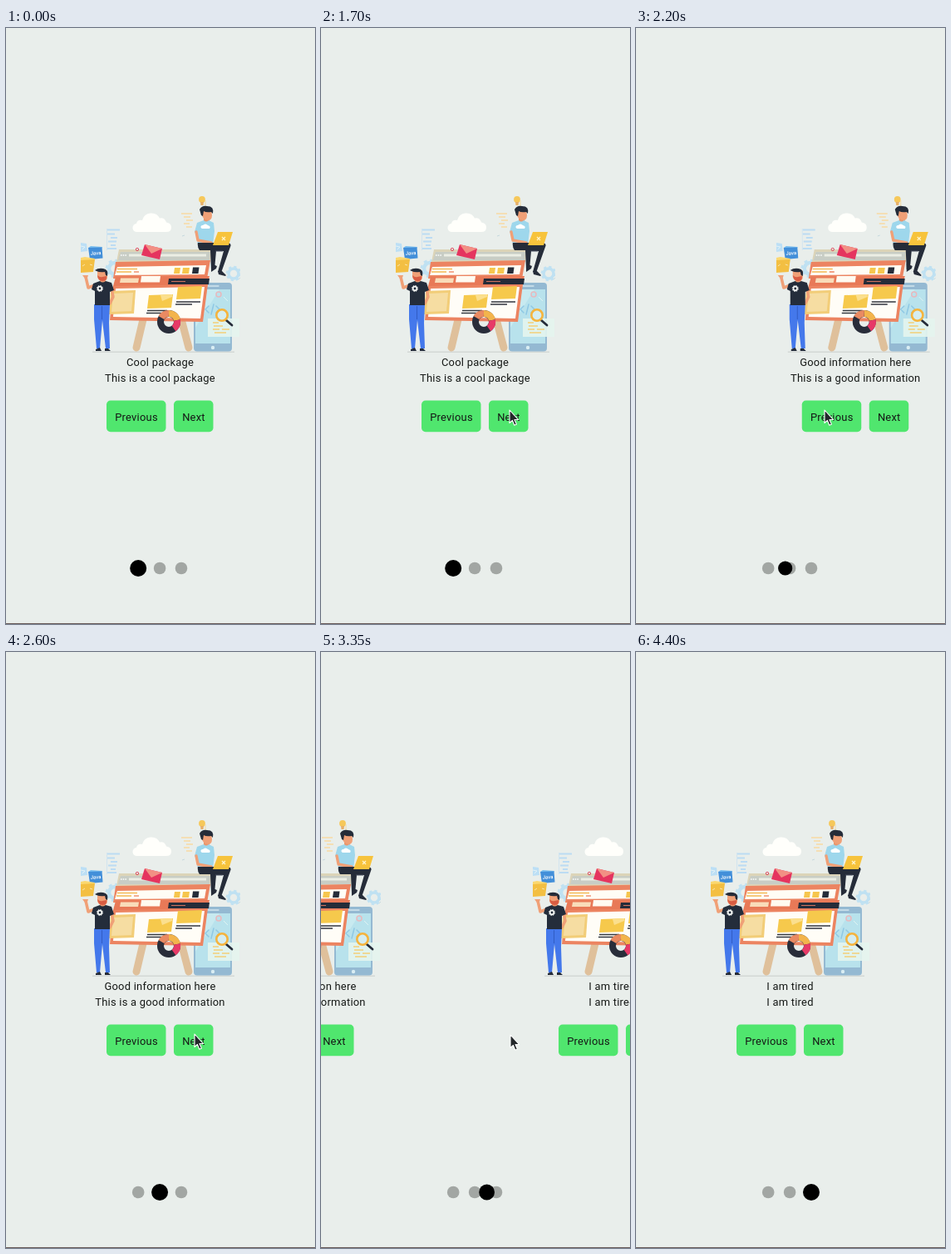
Recreate the animation shown at these times as an HTML page. Size 372 by 716 pixels, loop 5.55 s.

```html
<!DOCTYPE html>
<html lang="en">
<head>
<meta charset="utf-8">
<title>Onboarding pages</title>
<style>
html, body { margin: 0; height: 100%; overflow: hidden; background: #e9eeeb; }
svg { display: block; width: 100vw; height: 100vh; }
text { font: 12.95px Roboto, Arial, sans-serif; letter-spacing: .23px; text-anchor: middle; fill: #151816; }
#art text { font-size: 6px; font-weight: 500; letter-spacing: 0; fill: #fff; }
.line { fill: none; stroke-linecap: round; stroke-linejoin: round; }
</style>
</head>
<body>
<svg viewBox="0 0 372 716" preserveAspectRatio="none">
<defs>
<clipPath id="frame"><rect x="90" y="200" width="192" height="192"/></clipPath>

<g id="art" clip-path="url(#frame)">
  <path d="M104 389.3H275" stroke="#d3d8d5" stroke-width="1.6"/>

  <!-- cloud, bulb and floating code -->
  <path d="M158 245a5 5 0 0 1-1-10q1-5 7-4 2-8 10-8.500 8-.5 11 6 6-1 8 5 6 1 6 6 0 5.500-6 5.500z" fill="#fffffb"/>
  <circle cx="236" cy="206" r="3.900" fill="#f6c85a"/>
  <path d="M234 209h4l-.5 4h-3z" fill="#e7b06a"/>
  <path d="M240 207v7" stroke="#f3d9a0"/>
  <g stroke="#bcdcf3" stroke-width="2.200">
    <path d="M122 242.500h15M122 247.500h9M126 252h8M123 256.500h10M126 261h6M122 265h11"/>
    <path d="M121.500 241v26" stroke-width="1" opacity=".5"/>
  </g>
  <path d="M211 223h13M214 227h8M217 231h8M214 235h7M217 239h7" stroke="#f4dfb5" stroke-width="1.800"/>
  <path d="M212 250l3-1M280 302l2-2" stroke="#c5d8de"/>
  <path d="M90 258l7 1 1 9-8 1z" fill="#bcdff5"/>
  <path d="M90 262l5 1-3 3" class="line" stroke="#e4f2f6"/>
  <g fill="none" stroke="#bfe1f2">
    <circle cx="131" cy="289" r="7" stroke-width="4.500"/>
    <circle cx="131" cy="289" r="10" stroke-width="2.500" stroke-dasharray="4 3.850"/>
    <circle cx="274" cy="295" r="6" stroke-width="3.500"/>
    <circle cx="274" cy="295" r="8.300" stroke-width="2" stroke-dasharray="3.300 3.220"/>
  </g>

  <!-- cubes -->
  <path d="M99 264l3-2 14 1-1 2z" fill="#77bcee"/>
  <path d="M99 264l16.500-.5 1 13-15.500 1.500z" fill="#438fd9"/>
  <text x="108" y="272.500" transform="rotate(-3 108 272)">Java</text>
  <path d="M90 276l5-1 12 2-2 4-15-1z" fill="#fbd870"/>
  <path d="M90 279l17-1-2 15-15 1z" fill="#f3bf42"/>
  <path d="M92 286l3-2M101 284l3 1" stroke="#fae5aa"/>

  <!-- phone -->
  <rect x="226" y="306" width="46" height="82.500" rx="4" fill="#94b9d2"/>
  <path d="M228 314h42v65h-42z" fill="#b8e2ec"/>
  <path d="M228 314h29l-29 46z" fill="#c8eaf0"/>
  <path d="M242 310h14" class="line" stroke="#d3e6ee" stroke-width="1.300"/>
  <circle cx="249" cy="384" r="2.200" fill="#d9edf3"/>
  <circle cx="256" cy="320" r="3" fill="none" stroke="#e8b8bd" stroke-width="1.500"/>
  <path d="M231 324h7M233 328h6M262 323l5 5" stroke="#dff2f2"/>
  <path d="M244 334l-4 4 4 4M250 332l-3 12M253 334l4 4-4 4" class="line" stroke="#8fc8e4" stroke-width="1.500"/>

  <!-- easel -->
  <g class="line" stroke="#dfc09b" stroke-width="9">
    <path d="M166 346L157 384M210 346L220 384"/>
  </g>
  <path d="M136 266H248L246 281H133z" fill="#dcd4b8"/>
  <path d="M138 269H246L245 279H135z" fill="#c8cdc5"/>
  <path d="M148 273H241" stroke="#eceee4" stroke-width="3"/>
  <path d="M138 273h7" stroke="#fff" stroke-width="1.500" stroke-dasharray="1.500 1.200"/>
  <path d="M132 281L246 279L242 301H129z" fill="#ec8461"/>
  <path d="M134 287L241 285L239 296L131 297z" fill="#fffdf5"/>
  <path d="M134 289.500h24M133 293h18" stroke="#f4b956" stroke-width="1.600"/>
  <path d="M154 293h6" stroke="#ec8461" stroke-width="1.300"/>
  <path d="M203 288h7l-1 7h-7zM213 288h8l-1 7h-8z" fill="#f6c64e"/>
  <path d="M225 287.500h7.500l-1 7.500h-7.500z" fill="#252c39"/>
  <path d="M132 299L245 298L242 310H129z" fill="#e87957"/>
  <path d="M138 300.500h22l-1 5.500h-22z" fill="#f9dcb9"/>
  <path d="M163 298h23l-1 7.500h-23z" fill="#fffaf0"/>
  <path d="M196 301h49l-1 7h-49z" fill="#252c39"/>
  <path d="M199 304.500h17" stroke="#cf7260" stroke-width="1"/>
  <path d="M129 310L243 308L237 353L125 351z" fill="#ec8461"/>
  <path d="M132 313L239 311L234 349L129 347z" fill="#fffdf7"/>
  <path d="M126 316l30-1-2 28-30 1z" fill="#f2cd78"/>
  <path d="M129 319l24-1-2 22-24 1z" fill="#f6dda2"/>
  <path d="M172 321l29-1-2 16-29 1z" fill="#f6c94c"/>
  <path d="M186 321l2 7 12-5v-3z" fill="#fbdf8d"/>
  <path d="M207 311l29-1-2 15-29 1z" fill="#f6c94c"/>
  <path d="M205 329h29M204 332h20M170 339.500h24M169 342.500h18" stroke="#343941" stroke-width="1.400"/>
  <g fill="none" stroke-width="8">
    <circle cx="196" cy="353" r="10" stroke="#292d3a"/>
    <path d="M196 343a10 10 0 0 1 10 8" stroke="#f3b44c"/>
    <path d="M206 351a10 10 0 0 1-4 10" stroke="#e73967"/>
    <path d="M187 348a10 10 0 0 1 9-5" stroke="#e98a62"/>
  </g>

  <!-- envelope -->
  <path d="M167 260l21 5-3 13-22-5z" fill="#e5345f"/>
  <path d="M167 260l21 5-13 6z" fill="#f29084"/>
  <circle cx="158" cy="266" r="1.700" fill="none" stroke="#de5265"/>

  <!-- search panel -->
  <path d="M243 349h38v22h-38z" fill="#e5f5ef" opacity=".9"/>
  <path d="M249 354h7M250 358h11M249 362h8M260 362h9M251 366h14" stroke="#f2cf79" stroke-width="1.700"/>
  <path d="M265 351l7 6" class="line" stroke="#252c39" stroke-width="2.800"/>
  <circle cx="260" cy="345" r="6.700" fill="#d5edf0" stroke="#f5b43d" stroke-width="2.600"/>

  <!-- standing man -->
  <path d="M107 309L99 312L96 299" class="line" stroke="#f0a077" stroke-width="3.500"/>
  <path d="M92 297l7 0-1 3-3 1z" fill="#f0a077"/>
  <path d="M127 312l2 11-4 8" class="line" stroke="#f0a077" stroke-width="3.500"/>
  <path d="M106 332h19l-1 22 1 31h-5l-4-34-3 34h-4l-3-35z" fill="#4478eb"/>
  <path d="M115.500 334v16" stroke="#315cc4"/>
  <path d="M108 388v-2l5-2 2 4zM119 388v-3h4l3 3z" fill="#252c39"/>
  <path d="M113 299h7v6q-3 3-7 0z" fill="#e9966d"/>
  <path d="M105 307l8-3q3 3 7 0l7 2 3 9-5 2v16h-18v-17l-4-2z" fill="#242d3b"/>
  <circle cx="113" cy="313" r="2.300" fill="none" stroke="#f6f8f6" stroke-width="1.700"/>
  <circle cx="113" cy="313" r="3.600" fill="none" stroke="#f6f8f6" stroke-dasharray="1.400 1.430"/>
  <path d="M110 292h12v8q-1 5-6 4-5 0-6-5z" fill="#f0a077"/>
  <path d="M110 297q3 3 6 2l5-1q1 6-5 6-5 0-6-7z" fill="#d95d43"/>
  <path d="M107 291q4-3 10-2 7 1 5 9l-2-1-1-4q-6 1-10-1z" fill="#252c39"/>

  <!-- sitting man -->
  <path d="M238 226h7v8h-7z" fill="#e9966d"/>
  <path d="M236 218h11l1 7q0 6-5 6-6-1-7-6z" fill="#f0a077"/>
  <path d="M233 218q3-5 9-4 9 0 7 9l-2-2q-6 1-9-1l-1 6-2-1z" fill="#252c39"/>
  <path d="M230 234l8-3q3 3 6 0l6 3 1 10-2 17h-18l-1-13-3-3z" fill="#9ed7ec"/>
  <path d="M236 241a2 2 0 0 1 1-4q3-3 6 0 4 1 2 4z" fill="#fff"/>
  <path d="M229 245l2 10 16 3" class="line" stroke="#f0a077" stroke-width="3.400"/>
  <path d="M231 258h36q5 1 3 5l-11 31-4-1 7-25-9 0-2 22-4 0-1-23h-13q-3-4-2-10z" fill="#252c39"/>
  <path d="M252 268h9" stroke="#464f5e"/>
  <path d="M247 283l7 3-1 3-6 4zM255 292h5l5 5-1 1-8-2z" fill="#252c39"/>
  <path d="M255 245h18l-5 16h-19z" fill="#f7c33c"/>
  <path d="M260 251l4 4M264 251l-4 4" stroke="#fff4c9" stroke-width="1.300"/>
</g>

<g id="buttons">
  <rect x="121" y="447.500" width="71.500" height="37.700" rx="4.800" fill="#50e66e"/>
  <rect x="202" y="447.500" width="47.500" height="37.700" rx="4.800" fill="#50e66e"/>
  <text x="157" y="472">Previous</text>
  <text x="226" y="472">Next</text>
</g>
</defs>

<rect width="372" height="716" fill="#e9eeeb"/>
<g id="pages"></g>
<g fill="#a2a6a3">
  <circle cx="159.200" cy="649" r="7.300"/>
  <circle cx="185.100" cy="649" r="7.300"/>
  <circle cx="211" cy="649" r="7.300"/>
</g>
<circle id="dot" cy="649" fill="#000"/>
<path d="M0 715.500H372" stroke="#6a5c5a"/>
<path id="cursor" d="M1 1V16.500L4.400 13.400L6.800 19.200L9.400 18.100L7 12.500H11.600Z" fill="#23272a" stroke="#fff" stroke-width="1.100" stroke-linejoin="round"/>
</svg>

<script>
const LOOP = 5550, STRIDE = 375, DOT_X = 159.2, DOT_GAP = 25.9;
const $ = id => document.getElementById(id);

const captions = [
  ['Cool package', 'This is a cool package'],
  ['Good information here', 'This is a good information'],
  ['I am tired', 'I am tired']
];
$('pages').innerHTML = captions.map(([title, body], i) => `
  <g transform="translate(${i * STRIDE})">
    <use href="#art"/><use href="#buttons"/>
    <text x="185.500" y="406.300">${title}</text>
    <text x="185.500" y="424.800">${body}</text>
  </g>`).join('');

// [time, page position]
const scroll = [
  [0, 0], [2050, .17], [2100, .346], [2150, .56], [2200, .79], [2250, 1],
  [3150, 1.01], [3200, 1.06], [3250, 1.167], [3300, 1.346], [3350, 1.56], [3400, 1.79], [3450, 2]
];
// [time, radius]
const radius = [
  [0, 10], [2150, 9.4], [2200, 8.6], [2250, 7.8], [2300, 9.5], [2600, 10],
  [3350, 9.4], [3400, 8.6], [3450, 7.8], [3500, 8.5], [3550, 9.1], [3600, 9.5], [3700, 10]
];
// [time, x, y]
const pointer = [
  [0, -40, -40],
  [700, 81, 19], [800, 103, 78], [900, 138, 182], [1000, 172, 292], [1100, 197, 380], [1200, 209, 420],
  [1400, 218, 444], [1500, 235, 483], [1600, 231, 470], [1700, 226, 458], [3150, 227, 459],
  [3800, 235, 469], [3900, 213, 405], [4000, 168, 280], [4100, 118, 148], [4200, 80, 58], [4300, 61, 20],
  [4400, -40, -40]
];

const at = (steps, t) => steps.findLast(s => s[0] <= t);
const start = performance.now();

function draw() {
  const t = (performance.now() - start) % LOOP;
  const page = at(scroll, t)[1];
  const [, x, y] = at(pointer, t);
  $('pages').setAttribute('transform', `translate(${-page * STRIDE})`);
  $('dot').setAttribute('cx', DOT_X + page * DOT_GAP);
  $('dot').setAttribute('r', at(radius, t)[1]);
  $('cursor').setAttribute('transform', `translate(${x} ${y})`);
  requestAnimationFrame(draw);
}
draw();
</script>
</body>
</html>
```
